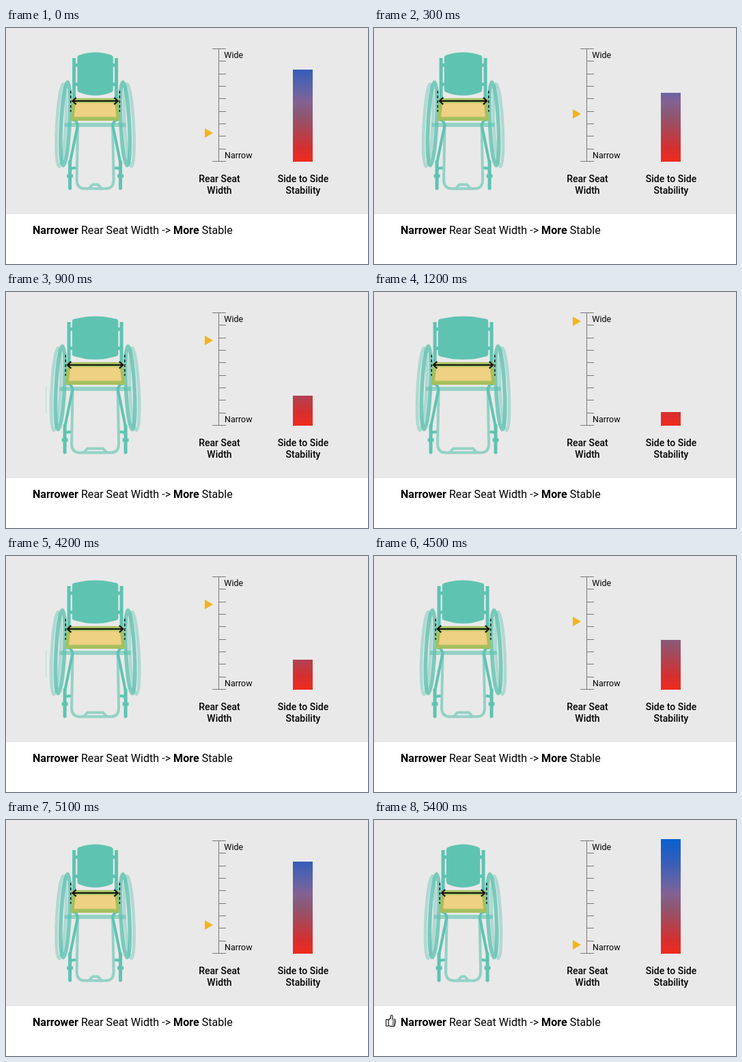
Write an HTML page that moves like this. It is 530 px wide and 346 px high and loops after 8.4 s.

```html
<!DOCTYPE html>
<html lang="en">
<head>
<meta charset="utf-8">
<title>Rear seat width and stability</title>
<style>
  html, body { margin: 0; width: 100%; height: 100%; overflow: hidden; background: #fff; }
  svg { display: block; width: 530px; height: 346px; font-family: Roboto, sans-serif; }
  .label { font-size: 12.5px; }
  .title { font-size: 14px; font-weight: 500; text-anchor: middle; }
  .note { font-size: 16.13px; }
  .bold { font-weight: 700; }
</style>
</head>
<body>
<svg viewBox="0 0 530 346">
  <defs>
    <linearGradient id="heat" gradientUnits="userSpaceOnUse" x1="0" y1="28" x2="0" y2="196">
      <stop offset="0" stop-color="#0a60d0"/>
      <stop offset=".2" stop-color="#355eb8"/>
      <stop offset=".4" stop-color="#6b63a4"/>
      <stop offset=".48" stop-color="#856191"/>
      <stop offset=".57" stop-color="#885a7a"/>
      <stop offset=".74" stop-color="#b04250"/>
      <stop offset=".88" stop-color="#d62f30"/>
      <stop offset=".96" stop-color="#e82c23"/>
    </linearGradient>
    <g id="wheels" fill="none" stroke="#5fc3b2">
      <ellipse cx="-48.3" cy="142.5" rx="6.5" ry="60.5" transform="rotate(3 -48.3 142.5)" stroke-width="4.5" opacity=".43"/>
      <ellipse cx="-42.2" cy="140.5" rx="6.2" ry="61" transform="rotate(3 -42.2 140.5)" stroke-width="5.6" opacity=".8"/>
    </g>
    <g id="frame" fill="none" stroke="#5fc3b2">
      <path d="M-29.5 44V137" stroke-width="5"/>
      <path d="M-28 54.5h5M-28 82.5h5" stroke-width="5"/>
      <path d="M-28 134L-24 142L-35.5 198" stroke-width="4" stroke-linejoin="round"/>
      <path d="M-35.5 196V235" stroke-width="5" stroke-linecap="round"/>
      <path d="M-35 206L-27 205" stroke-width="4"/>
      <path d="M-40 217h9" stroke-width="5"/>
    </g>
    <g id="mark" fill="none" stroke="#111">
      <path d="M-34.3 92V123" stroke-width="1.4" stroke-dasharray="4 3"/>
      <path d="M-26.3 102L-31.6 107L-26.3 112" stroke-width="2.2"/>
    </g>
  </defs>

  <rect width="530" height="273" fill="#e9e9e9"/>
  <path id="stray" d="M58.5 137V179" stroke="#5fc3b2" opacity=".35"/>

  <g transform="translate(130.6)">
    <g id="rear"></g>
    <g fill="none" stroke="#5fc3b2" stroke-width="4" opacity=".62">
      <path id="cross" stroke-width="6"/>
      <path id="tube"/>
      <path id="plate" stroke-linejoin="round"/>
    </g>
    <g id="sides"></g>
    <path id="back" fill="#5fc3b2" stroke="#5fc3b2" stroke-width="8" stroke-linejoin="round"/>
    <path id="seat" fill="#a5bf5f"/>
    <path id="cushion" fill="#eed182"/>
    <path id="span" stroke="#111" stroke-width="2"/>
    <g id="marks"></g>
  </g>

  <path id="scale" fill="none" stroke="#777" shape-rendering="crispEdges"/>
  <path id="pointer" d="M291-6.9L303 0L291 6.9Z" fill="#f1b51c"/>
  <rect id="bar" x="420" width="29" fill="url(#heat)"/>

  <text class="label" x="319.3" y="44">Wide</text>
  <text class="label" x="320" y="191">Narrow</text>
  <text class="title" x="312.5" y="226">Rear Seat</text>
  <text class="title" x="312.5" y="243">Width</text>
  <text class="title" x="435" y="226">Side to Side</text>
  <text class="title" x="435" y="243">Stability</text>
  <text class="note" x="38.9" y="301.5"><tspan class="bold">Narrower</tspan> Rear Seat Width -&gt; <tspan class="bold">More</tspan> Stable</text>

  <g id="thumb" fill="none" stroke="#111" stroke-width="1.1" stroke-linejoin="round" stroke-linecap="round">
    <path d="M17.6 292.5h3.6v9.5h-3.6z"/>
    <path d="M21.2 293.5L24.4 290.5V287Q25.4 285 27 286.8Q27.8 289 26.6 292H30.2Q32 293.2 30.6 294.8Q32.2 296 30.6 297.5Q31.8 298.8 30.2 300Q31 301.8 29 302.4H24.5L21.2 301.2"/>
    <path d="M27 294.8h3.6M27 297.5h3.6M27 300h3.2"/>
  </g>
</svg>
<script>
const $ = id => document.getElementById(id);
const draw = (id, d) => $(id).setAttribute('d', d);

// Poses from narrowest to widest.
const spread = [0, 1.5, 3, 6, 9, 12];
const pointerY = [183, 154, 126, 96, 71, 43];
const barTop = [28, 61, 95, 123, 152, 176];

const STEP = 300, HOLD = 3000, LOOP = 8400;

function levelAt(t) {
  const widest = 4 * STEP;
  if (t < widest) return 1 + Math.floor(t / STEP);
  if (t < widest + HOLD) return 5;
  return Math.max(0, 4 - Math.floor((t - widest - HOLD) / STEP));
}

// Places a left-hand part and its mirror image.
function pair(id, part, s) {
  $(id).innerHTML =
    `<use href="#${part}" x="${-s}"/>` +
    `<g transform="scale(-1 1)"><use href="#${part}" x="${-s}"/></g>`;
}

function trapezoid(top, bottom, y1, y2) {
  return `M${-top} ${y1}H${top}L${bottom} ${y2}H${-bottom}Z`;
}

function pose(level) {
  const s = spread[level];
  pair('rear', 'wheels', s);
  pair('sides', 'frame', s);
  pair('marks', 'mark', s);

  draw('cross', `M${-43.3 - s} 142H${43.3 + s}`);
  const a = 24 + s, b = 25.5 + s, c = 14 + s;
  draw('tube', `M${-a} 143L${-b} 222Q${-b} 235.5 ${-c} 235.5H${c}Q${b} 235.5 ${b} 222L${a} 143`);
  const p = 2.5 + s;
  draw('plate', `M${-p - 5.5} 235.5L${-p} 229.5H${p}L${p + 5.5} 235.5`);

  const w = 20.7 + s, m = 6 + s / 2;
  draw('back', `M${-w} 43.5Q${-m - 6} 40.5 ${-m} 40Q0 39.2 ${m} 40Q${m + 6} 40.5 ${w} 43.5` +
    `V90.5Q${m + 6} 94 ${m} 94.6Q0 95.4 ${-m} 94.6Q${-m - 6} 94 ${-w} 90.5Z`);
  draw('seat', trapezoid(32.5 + s, 34.7 + s, 103, 136));
  draw('cushion', trapezoid(27.2 + s, 29.5 + s, 110, 130.3));
  draw('span', `M${-31 - s} 107H${31 + s}`);

  $('pointer').setAttribute('transform', `translate(0 ${pointerY[level]})`);
  $('bar').setAttribute('y', barTop[level]);
  $('bar').setAttribute('height', 196 - barTop[level]);
  $('stray').style.display = level === 4 ? '' : 'none';
  $('thumb').style.display = level === 0 ? '' : 'none';
}

let ticks = 'M311.5 30V196';
for (let i = 0; i < 10; i++) {
  const left = i % 9 ? 311 : 302;
  ticks += `M${left} ${Math.floor(30.4 + i * 18.35) + 0.5}H322`;
}
draw('scale', ticks);

const start = performance.now();
let shown = -1;

function tick() {
  const level = levelAt((performance.now() - start) % LOOP);
  if (level !== shown) pose(shown = level);
  requestAnimationFrame(tick);
}
tick();
</script>
</body>
</html>
```
